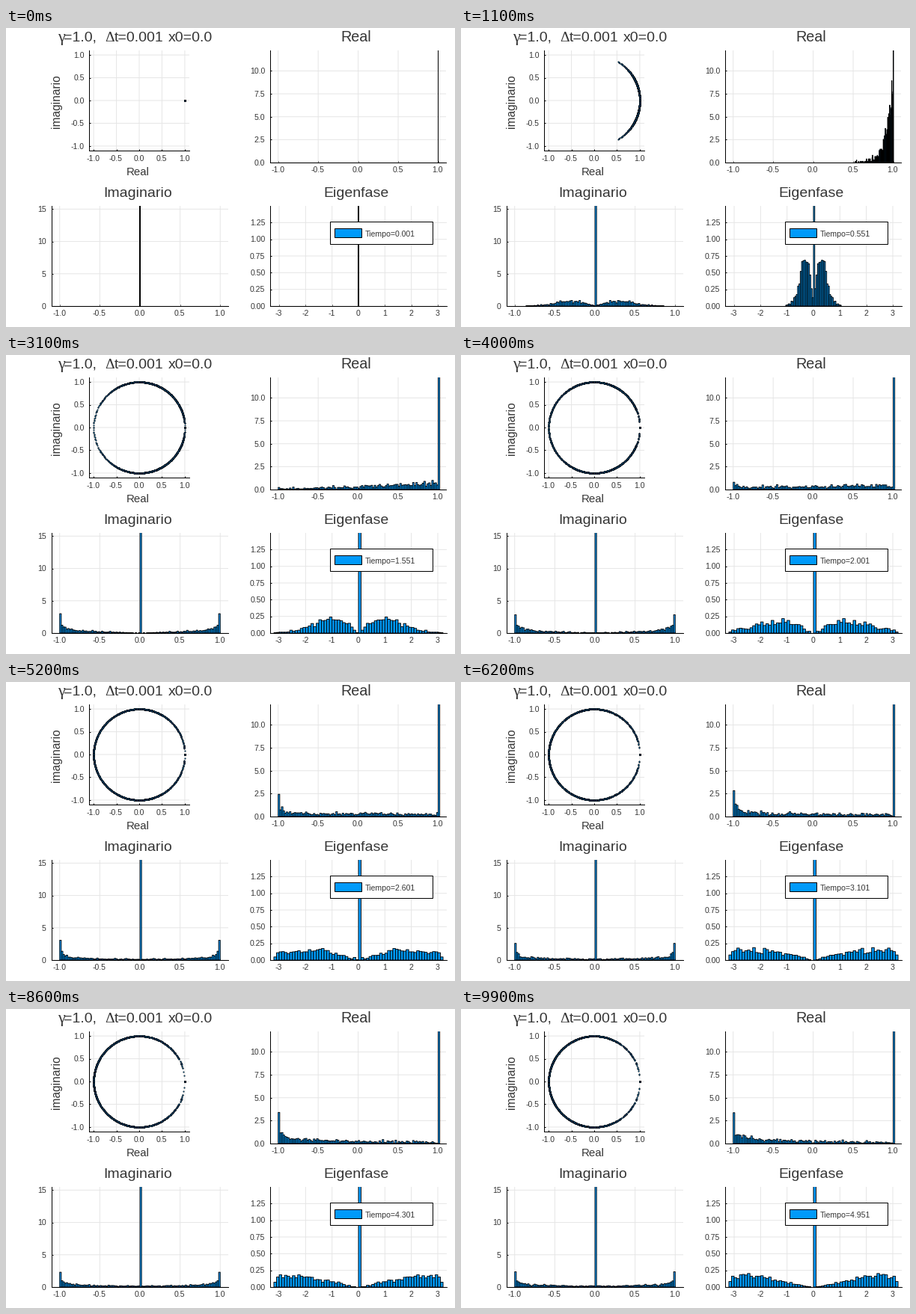
Animation, 600 px wide and 400 px high, one loop 10 s. Source, as a matplotlib script:

```python
import numpy as np
import matplotlib.pyplot as plt
from matplotlib.animation import FuncAnimation
from matplotlib.collections import PolyCollection
from matplotlib.patches import Rectangle

W, H, DPI = 600, 400, 100
PX = 72 / DPI
FRAMES, INTERVAL = 100, 100
BLUE, INK, GRID = "#009afa", "#363636", "#e6e6e6"
SANS, SERIF = "Liberation Sans", "Liberation Serif"

GAMMA, DT, STRIDE, WALKERS = 1.0, .001, 50, 1000


def simulate():
    """Rotation angles of 3x3 rotations driven by two noisy generators.

    Each rotation is a unit quaternion (a, b); the complex drive w is an
    Ornstein-Uhlenbeck process that starts at zero.
    """
    rng = np.random.default_rng(11)
    a = np.ones(WALKERS, complex)
    b = np.zeros(WALKERS, complex)
    w = np.zeros(WALKERS, complex)
    angles = []
    for step in range((FRAMES - 1) * STRIDE + 1):
        kick = rng.normal(size=(2, WALKERS))
        w += -GAMMA * w * DT + np.sqrt(2 * DT) * (kick[0] + 1j * kick[1])
        turn = w * DT / 2
        a, b = a - turn.conj() * b, b + turn * a
        norm = np.sqrt(abs(a) ** 2 + abs(b) ** 2)
        a, b = a / norm, b / norm
        if step % STRIDE == 0:
            angles.append(2 * np.arctan2(np.hypot(abs(b), a.imag), abs(a.real)))
    return angles


def nice_step(span, n):
    raw = span / n
    unit = 10.0 ** np.floor(np.log10(raw))
    r = raw / unit
    return unit * (1 if r <= 1.1 else 2 if r <= 2.2 else 5 if r <= 5.5 else 10)


def bars(values, n, top):
    step = nice_step(np.ptp(values), n)
    index, count = np.unique(np.floor(values / step + 1e-9), return_counts=True)
    height = np.minimum(count / (len(values) * step), 2 * top)
    return [[(i * step, 0), (i * step, h), ((i + 1) * step, h), ((i + 1) * step, 0)]
            for i, h in zip(index, height)]


fig = plt.figure(figsize=(W / DPI, H / DPI), dpi=DPI, facecolor="white")


def label(x, y, s, size, ha="center", font=SANS, **kw):
    kw.setdefault("va", "baseline")
    return fig.text(x / W, 1 - y / H, s, fontsize=size * PX, ha=ha,
                    family=font, color=INK, **kw)


def panel(box, xlim, ylim, xticks, yticks, xfmt, yfmt, xbase, yright):
    x0, y0, x1, y1 = box
    ax = fig.add_axes([x0 / W, 1 - y1 / H, (x1 - x0) / W, (y1 - y0) / H])
    ax.set(xlim=xlim, ylim=ylim, xticks=xticks, yticks=yticks)
    ax.set_axisbelow(True)
    ax.grid(color=GRID, lw=PX)
    for line in ax.get_xgridlines() + ax.get_ygridlines():
        line.set_snap(False)
    ax.tick_params(direction="in", length=2.5 * PX, width=PX,
                   labelbottom=False, labelleft=False)
    for side, spine in ax.spines.items():
        spine.set_visible(side in ("left", "bottom"))
        spine.set_linewidth(PX)
    for v in xticks:
        px = x0 + (v - xlim[0]) / (xlim[1] - xlim[0]) * (x1 - x0)
        label(px - .6, xbase, format(v, xfmt), 10.5)
    for v in yticks:
        py = y1 - (v - ylim[0]) / (ylim[1] - ylim[0]) * (y1 - y0)
        label(yright, py + 3.8, format(v, yfmt), 10.5, ha="right")
    return ax


def histogram(ax):
    poly = PolyCollection([], facecolors=BLUE, edgecolors="black",
                          linewidths=.9 * PX, snap=False, zorder=2)
    ax.add_collection(poly, autolim=False)
    return poly


def legend_box(x, y, w, h, color):
    fig.add_artist(Rectangle((x / W, 1 - (y + h) / H), w / W, h / H,
                             transform=fig.transFigure, fc=color,
                             ec="black", lw=PX, zorder=5))


halves = np.linspace(-1, 1, 5)
unit = (-1.1, 1.1)
circle = panel((111, 30, 245, 164), unit, unit, halves, halves,
               ".1f", ".1f", 178, 105)
real = panel((353, 30, 588.2, 180), unit, (0, 12.24), halves,
             np.arange(0, 11, 2.5), ".1f", ".1f", 193, 346.5)
imag = panel((61, 238, 297, 372), unit, (0, 15.5), halves,
             range(0, 16, 5), ".1f", "d", 385, 53.5)
phase = panel((353, 238, 589, 372), (-3.34, 3.34), (0, 1.5),
              range(-3, 4), np.arange(0, 1.3, .25), "d", ".2f", 385, 346.5)

label(69.5, 18, "γ", 22, "left", SERIF)
label(76.5, 18, "=1.0,", 19.5, "left")
label(132, 18, "Δ", 19.5, "left", SERIF)
label(144.5, 18, "t=0.001", 19.5, "left")
label(216.5, 18, "x0=0.0", 19.5, "left")
label(468, 18.5, "Real", 19.8)
label(176, 225.5, "Imaginario", 19.5)
label(468.5, 225.5, "Eigenfase", 19.5)
label(176.5, 197, "Real", 15)
label(67, 98, "imaginario", 15.5, rotation=90, va="center")

dots, = circle.plot([], [], "o", ms=1.4 * PX, mfc=BLUE, mec="black",
                    mew=.6 * PX, snap=False, zorder=3)
real_bars, imag_bars, phase_bars = map(histogram, (real, imag, phase))

legend_box(433, 259, 137, 30, "white")
legend_box(439, 268, 36, 12, BLUE)
clock = label(480, 278.7, "", 10.5, "left", zorder=6)

angles = simulate()


def update(k):
    theta = np.concatenate([-angles[k], np.zeros(WALKERS), angles[k]])
    x, y = np.cos(theta), np.sin(theta)
    dots.set_data(x, y)
    real_bars.set_verts(bars(x, 100, 12.24))
    imag_bars.set_verts(bars(y, 100, 15.5))
    phase_bars.set_verts(bars(theta, 80, 1.5))
    clock.set_text(f"Tiempo={(k * STRIDE + 1) * DT:.3f}")
    return dots, real_bars, imag_bars, phase_bars, clock


anim = FuncAnimation(fig, update, frames=FRAMES, interval=INTERVAL,
                     repeat=True, repeat_delay=0, blit=False)
plt.show()
```
